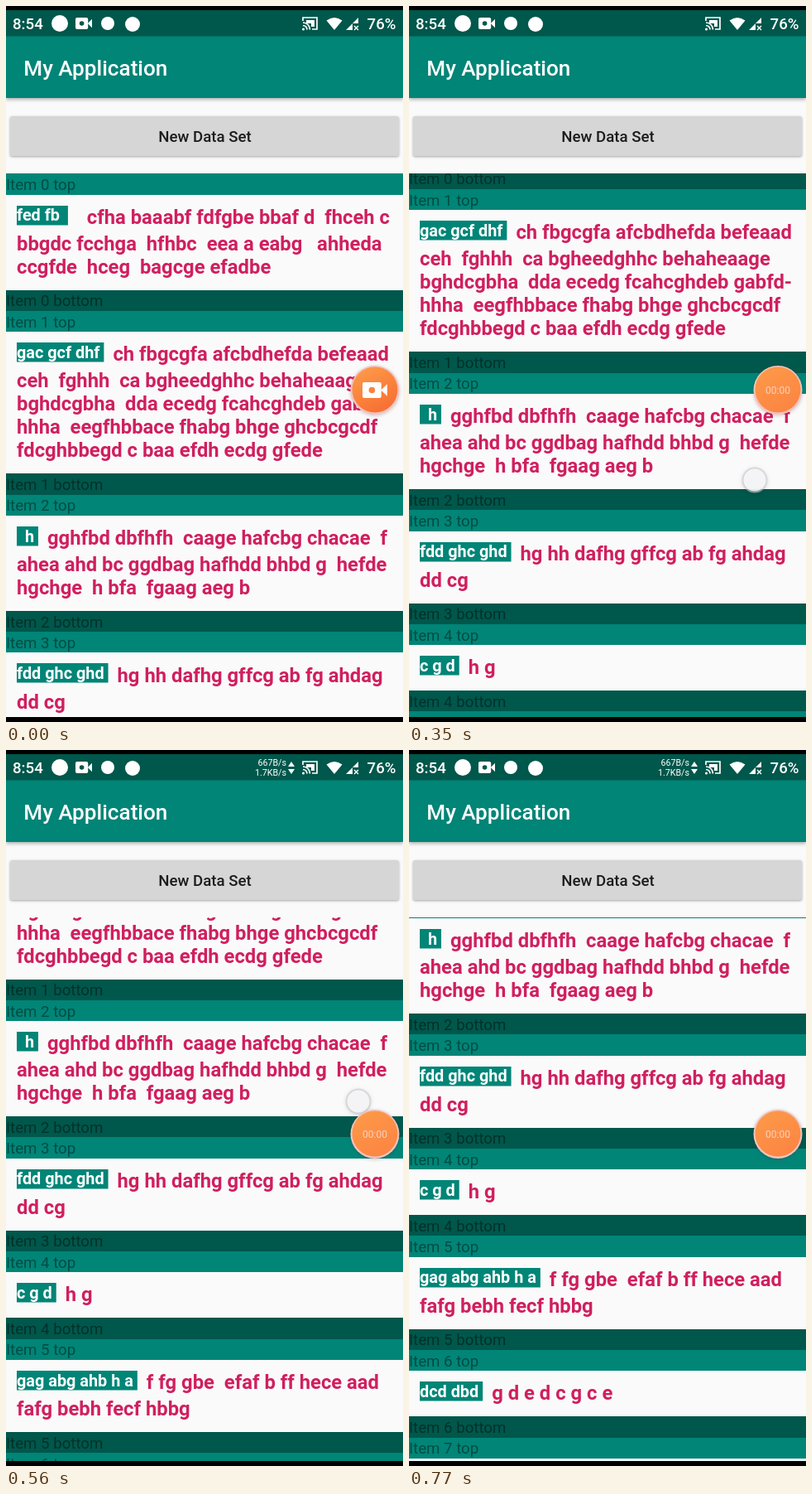
Animation of 480 by 864 pixels, one loop 840 ms. Source, as an HTML page with a canvas:

```html
<!DOCTYPE html>
<html lang="en">
<head>
<meta charset="utf-8">
<title>Scrolling list</title>
<style>
html, body { margin: 0; width: 100%; height: 100%; overflow: hidden; background: #000; }
canvas { display: block; }
</style>
</head>
<body>
<canvas id="stage" width="480" height="864"></canvas>
<script>
const ctx = document.getElementById('stage').getContext('2d');
const STEP = 70, STEPS = 12;
const TEAL = '#008577', DARK = '#00574b', PAPER = '#fafafa', PINK = '#d01f5e';
const LIST_TOP = 202, FIRST_ITEM = 202.4, SCREEN_BOTTOM = 858, BAR = 25.3;
const SMALL = 18.67, CHIP = 19.85, LARGE = 23.8;

const SCROLL = [0, 11, 39.7, 76, 111.6, 147, 181.7, 234, 287.8, 335.4, 376, 412];
// Finger position per step; absent while nothing touches the screen.
const TOUCH = [null, [408, 714], [410, 684], [413, 648], [415, 610], [418, 572],
  [421, 534], [424, 480], [426, 424], [427, 410]];
const RELEASE_STEP = 9, SPEED_STEP = 6;

const ITEMS = [
  ['fed fb  ', '  cfha baaabf fdfgbe bbaf d  fhceh c',
    'bbgdc fcchga  hfhbc  eea a eabg   ahheda', 'ccgfde  hceg  bagcge efadbe'],
  ['gac gcf dhf ', 'ch fbgcgfa afcbdhefda befeaad',
    'ceh  fghhh  ca bgheedghhc behaheaage', 'bghdcgbha  dda ecedg fcahcghdeb gabfd-',
    'hhha  eegfhbbace fhabg bhge ghcbcgcdf', 'fdcghbbegd c baa efdh ecdg gfede'],
  ['  h ', 'gghfbd dbfhfh  caage hafcbg chacae  f',
    'ahea ahd bc ggdbag hafhdd bhbd g  hefde', 'hgchge  h bfa  fgaag aeg b'],
  ['fdd ghc ghd ', 'hg hh dafhg gffcg ab fg ahdag', 'dd cg'],
  ['c g d ', 'h g'],
  ['gag abg ahb h a ', 'f fg gbe  efaf b ff hece aad', 'fafg bebh fecf hbbg'],
  ['dcd dbd ', 'g d e d c g c e'],
  ['', '']
];

function rect(x, y, w, h, color) {
  ctx.fillStyle = color;
  ctx.fillRect(x, y, w, h);
}

function circle(x, y, r, color) {
  ctx.fillStyle = color;
  ctx.beginPath();
  ctx.arc(x, y, r, 0, Math.PI * 2);
  ctx.fill();
}

function poly(color, ...points) {
  ctx.fillStyle = color;
  ctx.beginPath();
  for (const [x, y] of points) ctx.lineTo(x, y);
  ctx.fill();
}

function round(x, y, w, h, r, color) {
  ctx.fillStyle = color;
  ctx.beginPath();
  ctx.roundRect(x, y, w, h, r);
  ctx.fill();
}

function text(str, x, y, size, weight, color, align = 'left') {
  ctx.font = `${weight} ${size}px Roboto, sans-serif`;
  ctx.textAlign = align;
  ctx.fillStyle = color;
  ctx.fillText(str, x, y);
}

function shadow(color, blur, dy, draw) {
  ctx.save();
  ctx.shadowColor = color;
  ctx.shadowBlur = blur;
  ctx.shadowOffsetY = dy;
  draw();
  ctx.restore();
}

function camera(x, y, w, h, lens) {
  round(x, y, w * .76, h, 2, '#fff');
  poly('#fff', [x + w * .74, y + h / 2], [x + w, y + h * .12], [x + w, y + h * .88]);
  circle(x + w * .38, y + h / 2, h * .2, lens);
}

function drawBar(y, label, color) {
  const top = Math.round(y);
  rect(0, top, 480, Math.round(y + BAR) - top, color);
  text(label, 0, y + 19.7, SMALL, 400, 'rgba(0,0,0,.43)');
}

function drawItem(index, y) {
  const [chip, ...lines] = ITEMS[index];
  const bodyTop = y + BAR;
  const height = 55 + (lines.length > 1 ? 4 : 0) + 28 * (lines.length - 1);
  drawBar(y, `Item ${index} top`, TEAL);

  ctx.font = `700 ${CHIP}px Roboto, sans-serif`;
  const chipWidth = ctx.measureText(chip).width;
  rect(13, Math.round(bodyTop + 13), chipWidth, 23.5, TEAL);
  text(chip, 13, bodyTop + 31.6, CHIP, 700, '#fff');
  lines.forEach((line, i) => {
    const x = i ? 13 : 24 + chipWidth;
    text(line, x, bodyTop + 35 + (i ? 4 + 28 * i : 0), LARGE, 700, PINK);
  });

  drawBar(bodyTop + height, `Item ${index} bottom`, DARK);
  return bodyTop + height + BAR;
}

function drawList(scroll) {
  ctx.save();
  ctx.beginPath();
  ctx.rect(0, LIST_TOP, 480, SCREEN_BOTTOM - LIST_TOP);
  ctx.clip();
  let y = FIRST_ITEM - scroll;
  ITEMS.forEach((_, i) => { y = drawItem(i, y); });
  ctx.restore();
}

function drawStatus(showSpeed) {
  rect(0, 5, 480, 31.5, DARK);
  text('8:54', 8, 28, SMALL, 500, '#fff');
  circle(65, 21, 10, '#fff');
  camera(84, 14, 20, 14, DARK);
  circle(123, 21, 8, '#fff');
  circle(153, 22, 9, '#fff');

  if (showSpeed) {
    text('667B/s', 339, 19, 10.67, 400, '#fff', 'right');
    text('1.7KB/s', 339, 31, 10.67, 400, '#fff', 'right');
    poly('#fff', [341, 20], [345, 14], [349, 20]);
    poly('#fff', [341, 23], [345, 29], [349, 23]);
  }

  // Cast
  ctx.strokeStyle = '#fff';
  ctx.lineWidth = 1.7;
  ctx.beginPath();
  ctx.moveTo(359, 18);
  ctx.lineTo(359, 14);
  ctx.lineTo(376, 14);
  ctx.lineTo(376, 28);
  ctx.lineTo(370, 28);
  for (const r of [5, 8.5]) {
    ctx.moveTo(359, 28.5 - r);
    ctx.arc(359, 28.5, r, -Math.PI / 2, 0);
  }
  ctx.stroke();
  rect(363, 17, 10, 4, '#fff');
  rect(369, 20, 4, 5, '#fff');
  circle(359.5, 28, 1.5, '#fff');

  // Wi-Fi and mobile signal
  ctx.fillStyle = '#fff';
  ctx.beginPath();
  ctx.moveTo(397, 29);
  ctx.lineTo(387.5, 17.5);
  ctx.quadraticCurveTo(397, 10.5, 406.5, 17.5);
  ctx.fill();
  poly('#fff', [411, 29], [426, 14], [426, 21], [419, 21], [419, 29]);
  ctx.lineWidth = 1.4;
  ctx.beginPath();
  ctx.moveTo(421, 24);
  ctx.lineTo(426, 29);
  ctx.moveTo(426, 24);
  ctx.lineTo(421, 29);
  ctx.stroke();
  text('76%', 471.5, 28, SMALL, 500, '#fff', 'right');
}

function drawHeader() {
  shadow('rgba(0,0,0,.3)', 4, 1.5, () => rect(0, 36, 480, 75, TEAL));
  text('My Application', 21.3, 84, 26.1, 500, '#fff');
  shadow('rgba(0,0,0,.35)', 3, 1, () => round(5, 133, 470, 48, 2.5, '#d6d6d6'));
  text('New Data Set', 240.5, 164, SMALL, 500, '#1c1c1c', 'center');
}

function drawTouch(point, released) {
  if (!point) return;
  const [x, y] = point;
  if (released) {
    circle(x, y, 14, 'rgba(225,230,230,.5)');
    return;
  }
  shadow('rgba(0,0,0,.2)', 4, 1, () => circle(x, y, 15.5, 'rgba(205,205,212,.6)'));
  circle(x, y, 13.5, 'rgba(252,251,253,.8)');
}

function drawRecorder(recording) {
  const fill = ctx.createLinearGradient(432, 438, 460, 490);
  fill.addColorStop(0, '#fd9848');
  fill.addColorStop(1, recording ? '#fc8442' : '#f76d32');
  shadow('rgba(70,20,40,.25)', 4, 1, () => circle(446, 463.5, 29.5, '#f3c3bd'));
  circle(446, 463, 27.5, fill);
  if (recording) text('00:00', 446, 467.5, 12, 400, '#fcd0bc', 'center');
  else camera(431, 454, 30, 19, '#f9843a');
}

function render(now) {
  const step = Math.floor(now / STEP) % STEPS;
  rect(0, 0, 480, 864, '#000');
  rect(0, 37, 480, SCREEN_BOTTOM - 37, PAPER);
  drawList(SCROLL[step]);
  drawHeader();
  drawStatus(step >= SPEED_STEP);
  drawTouch(TOUCH[step], step >= RELEASE_STEP);
  drawRecorder(step > 0);
  rect(0, SCREEN_BOTTOM, 480, 6, '#000');
}

const start = performance.now();
function tick() {
  render(performance.now() - start);
  requestAnimationFrame(tick);
}
tick();
</script>
</body>
</html>
```
